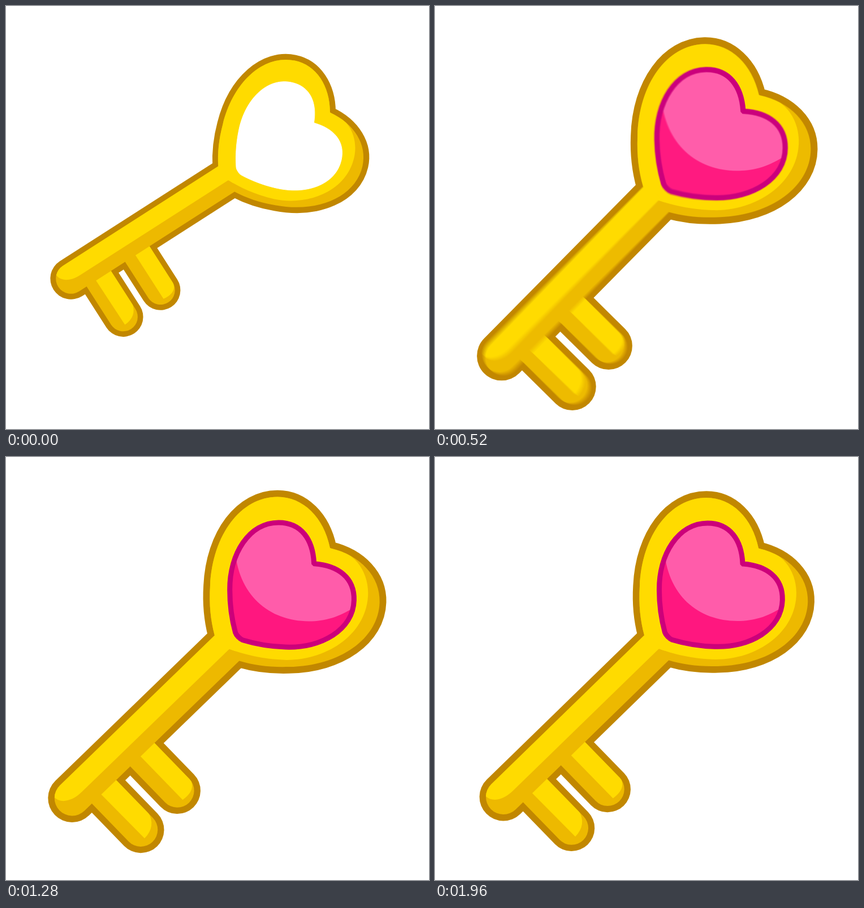
These frames come from a looping animation (748x748 px, 2 s). An HTML page with a canvas:

```html
<!DOCTYPE html>
<html>
<head>
<meta charset="utf-8">
<style>
html, body { margin: 0; width: 100%; height: 100%; overflow: hidden; background: #fff; }
canvas { display: block; width: 748px; height: 748px; }
</style>
</head>
<body>
<canvas id="stage" width="748" height="748"></canvas>
<script>
const SIZE = 748, LOOP = 2000, STEP = 40, START = 160;
const BROWN = '#c18700', GOLD = '#edb900', LIGHT = '#ffdb00';
const PINK = '#ff177f', ROSE = '#ff5caa', RIM = '#cc007a';
const PIVOT = [488, 241], GEM = [517, 214], TIP = [121, 601];
const AXIS = -44.24 * Math.PI / 180;

const view = document.getElementById('stage').getContext('2d');
const layer = document.createElement('canvas');
layer.width = layer.height = SIZE;
const pen = layer.getContext('2d');

// Reflect a point across the key's long axis.
function mirror([x, y]) {
  const c = Math.cos(2 * AXIS), s = Math.sin(2 * AXIS);
  const dx = x - 582, dy = y - 152;
  return [582 + c * dx + s * dy, 152 + s * dx - c * dy];
}

// Bezier chain for one lobe, notch to point; the other lobe is its mirror.
function heart(half) {
  const path = new Path2D();
  const all = half.concat(half.slice(0, -1).reverse().map(mirror));
  path.moveTo(...all[0]);
  for (let i = 1; i + 2 < all.length; i += 3) {
    path.bezierCurveTo(...all[i], ...all[i + 1], ...all[i + 2]);
  }
  path.closePath();
  return path;
}

const head = heart([
  [572, 161], [561, 108], [525, 72], [480, 72],
  [416, 72], [366, 138], [362, 228],
  [360, 262], [363, 288], [370, 315],
  [376, 321], [384, 329], [392, 337]
]);

const gem = heart([
  [544, 188], [542, 147], [522, 117], [482, 117],
  [430, 117], [396, 172], [396.5, 235],
  [396.5, 265], [401, 290], [406.5, 310],
  [407.5, 313], [409, 315], [412, 318]
]);

const shine = new Path2D('M572 161C612 165 639 200 639 240C639 310 570 358 496 358' +
  'C455 357 420 348 396 339L138 590C120 608 100 610 90 600L0 600L0 0L572 0Z');
const gloss = new Path2D('M405 160C410 245 466 290 535 290C565 290 590 282 620 262L640 100L400 100Z');

// Shaft and teeth live in a frame with x along the shaft.
const place = new DOMMatrix().translate(...TIP).rotate(-44.24);
function placed(path) {
  const out = new Path2D();
  out.addPath(path, place);
  return out;
}
function shaft(r) {
  const p = new Path2D();
  p.arc(0, 0, r, Math.PI / 2, Math.PI * 1.5);
  p.lineTo(385, -r);
  p.lineTo(385, r);
  p.closePath();
  return placed(p);
}
function tooth(x, y, r) {
  const p = new Path2D();
  p.arc(x, y, r, 0, Math.PI);
  p.lineTo(x - r, 0);
  p.lineTo(x + r, 0);
  p.closePath();
  return placed(p);
}
const bars = (r, w) => [shaft(r), tooth(47.8, 123.6, w), tooth(141.4, 118.8, w)];
const outer = bars(42.4, 40.8), inner = bars(31, 29.6);
const toothShine = [
  placed(new Path2D('M41 31L42 139Q72 138 78.6 110L79 31Z')),
  placed(new Path2D('M137 31L137 137Q170 142 173 114L173 31Z'))
];

function fill(path, color) {
  pen.fillStyle = color;
  pen.fill(path);
}
function fillIn(mask, path, color) {
  pen.save();
  pen.clip(mask);
  fill(path, color);
  pen.restore();
}

// Smooth swings between [time, value] turning points.
function swing(t, keys) {
  if (t <= keys[0][0]) return keys[0][1];
  for (let i = 1; i < keys.length; i++) {
    const [t0, a] = keys[i - 1], [t1, b] = keys[i];
    if (t < t1) return a + (b - a) * (1 - Math.cos(Math.PI * (t - t0) / (t1 - t0))) / 2;
  }
  return keys[keys.length - 1][1];
}

const TILT = [[START, 11.58], [392, -5.4], [660, 3.8], [880, -1.4], [1110, 0.65], [1410, -0.2], [1640, 0]];
const POP = [[START, 0], [400, 1.205], [540, 1]];

function zoom(t) {
  const small = 0.864, big = 1.03, peak = 750;
  if (t <= START) return small;
  if (t < peak) return big - (big - small) * Math.pow((peak - t) / (peak - START), 5.3);
  return 1 + (big - 1) * Math.pow(Math.max(0, 1960 - t) / (1960 - peak), 2.2);
}

function drawGem(size) {
  if (size < 0.01) return;
  pen.save();
  pen.translate(...GEM);
  pen.scale(size, size);
  pen.translate(-GEM[0], -GEM[1]);
  fill(gem, PINK);
  fillIn(gem, gloss, ROSE);
  pen.strokeStyle = RIM;
  pen.lineWidth = 9;
  pen.stroke(gem);
  pen.restore();
}

function drawKey(t) {
  const k = zoom(t);
  pen.setTransform(1, 0, 0, 1, 0, 0);
  pen.clearRect(0, 0, SIZE, SIZE);
  pen.translate(...PIVOT);
  pen.rotate(swing(t, TILT) * Math.PI / 180);
  pen.scale(k, k);
  pen.translate(-PIVOT[0], -PIVOT[1]);

  outer.forEach(p => fill(p, BROWN));
  pen.strokeStyle = BROWN;
  pen.lineWidth = 23.4;
  pen.stroke(head);
  fill(head, GOLD);
  inner.forEach(p => fill(p, GOLD));
  fillIn(head, shine, LIGHT);
  fillIn(inner[0], shine, LIGHT);
  toothShine.forEach((p, i) => fillIn(inner[i + 1], p, LIGHT));

  // Open the hole that holds the gem.
  pen.globalCompositeOperation = 'destination-out';
  pen.lineWidth = 1;
  pen.fill(gem);
  pen.stroke(gem);
  pen.globalCompositeOperation = 'source-over';
  drawGem(swing(t, POP));
}

// Motion blur inside a crisp silhouette.
function render(t) {
  view.globalCompositeOperation = 'source-over';
  view.globalAlpha = 1;
  view.clearRect(0, 0, SIZE, SIZE);
  drawKey(t);
  view.drawImage(layer, 0, 0);
  if (t <= START || t > 960) return;
  const n = 8, shutter = 20;
  view.globalCompositeOperation = 'source-atop';
  for (let i = 0; i < n; i++) {
    drawKey(t + shutter * (i / (n - 1) - 0.5));
    view.globalAlpha = 1 / (i + 1);
    view.drawImage(layer, 0, 0);
  }
}

let shown = -1;
const begin = performance.now();
function tick() {
  const now = Math.max(0, performance.now() - begin) % LOOP;
  const t = Math.floor(now / STEP) * STEP;
  if (t !== shown) render(shown = t);
  requestAnimationFrame(tick);
}
tick();
</script>
</body>
</html>
```
